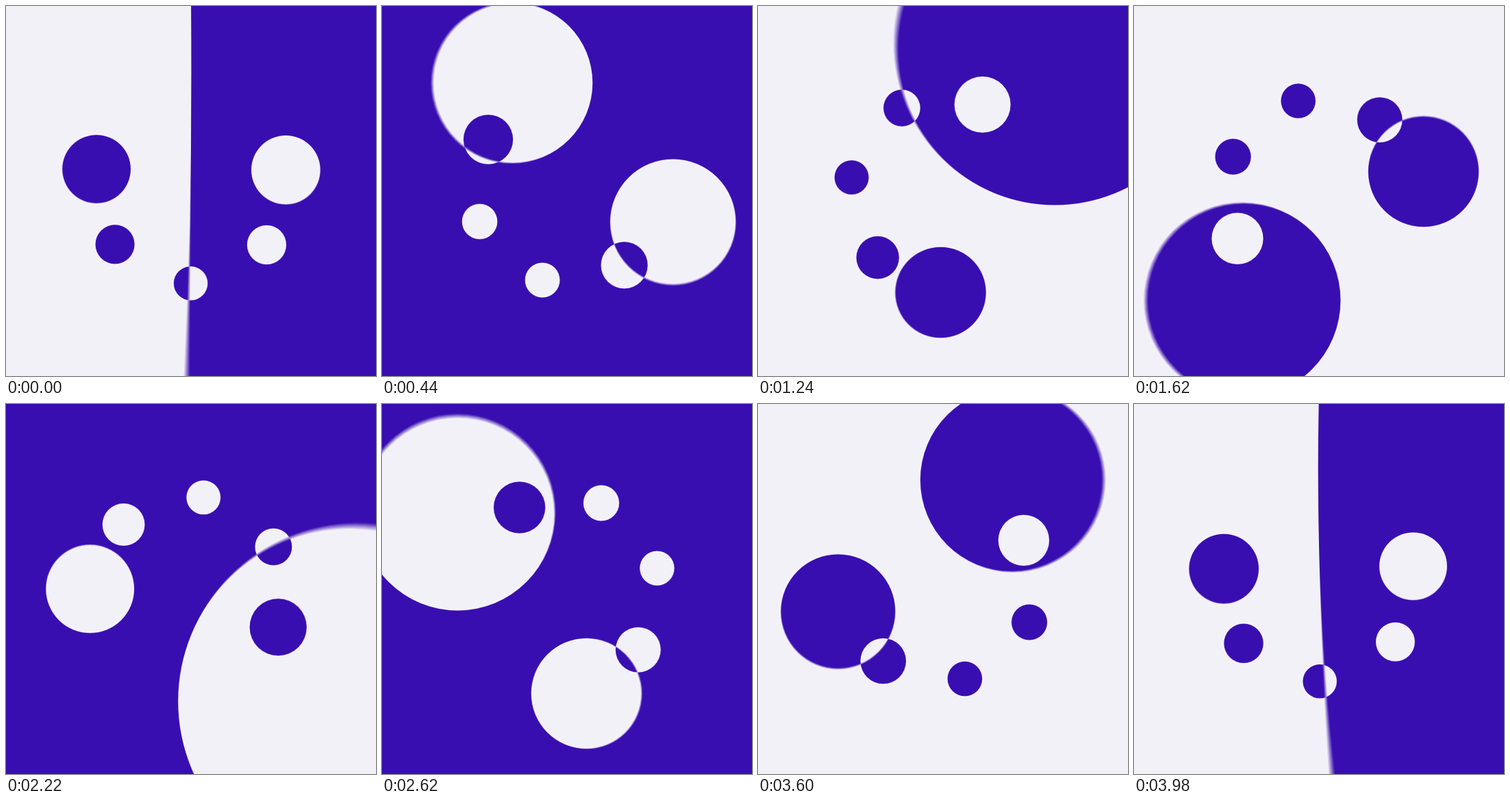
An HTML page with a canvas that plays this animation: 540 by 540 pixels, repeating every 4000 ms.

```html
<!DOCTYPE html>
<html lang="en">
<head>
<meta charset="utf-8">
<title>Inverting circles</title>
<style>
  html, body { margin: 0; width: 100%; height: 100%; overflow: hidden; background: #390eb1; }
  canvas { display: block; }
</style>
</head>
<body>
<canvas width="540" height="540"></canvas>
<script>
const ctx = document.querySelector('canvas').getContext('2d');
const LIGHT = '#f3f1f8', BLUE = '#390eb1';
const SIZE = 540, MID = SIZE / 2, LOOP = 4000, STEP = 1000;
const COUNT = 6, RING = 132.5, MIN_R = 24.75;
const SHUTTER = 8, SAMPLES = 8;
const rad = Math.PI / 180;

// Slows the phase a little where a circle opens into a straight line.
function settle(phase) {
  const near = Math.min(phase, 180 - phase);
  const lag = 1.25 * near / 9 * Math.exp(1 - near / 9);
  return phase + (phase < 90 ? -lag : lag);
}

// Each circle stays orthogonal to the ring while its curvature swings through zero.
function addCircle(path, phase, turn) {
  const p = settle(phase) * rad;
  const r = MIN_R / Math.max(Math.sin(p), 2e-4);
  const d = Math.hypot(r, RING);
  const lean = Math.atan(0.1854 / Math.tan(p)) - rad * Math.sin(2 * phase * rad);
  const a = Math.PI - 2 * phase * rad - lean + turn;
  const x = MID - d * Math.sin(a), y = MID + d * Math.cos(a);
  path.moveTo(x + r, y);
  path.arc(x, y, r, 0, 2 * Math.PI);
}

function drawAt(time) {
  const t = time % LOOP;
  const flipped = Math.floor(t / STEP) % 2 === 1;
  const shift = t % STEP / STEP;
  const path = new Path2D();
  for (let i = 0; i < COUNT; i++) {
    addCircle(path, (i + shift) * 180 / COUNT, t / LOOP * 2 * Math.PI);
  }
  ctx.fillStyle = flipped ? LIGHT : BLUE;
  ctx.fillRect(0, 0, SIZE, SIZE);
  ctx.fillStyle = flipped ? BLUE : LIGHT;
  ctx.fill(path, 'evenodd');
}

// One sample is drawn off screen, then blended in, giving an even motion blur.
const stage = ctx.canvas;
const blend = document.createElement('canvas');
blend.width = blend.height = SIZE;
const mix = blend.getContext('2d');

function frame(now) {
  for (let i = 0; i < SAMPLES; i++) {
    drawAt(now + (i + 0.5) / SAMPLES * SHUTTER);
    mix.globalAlpha = 1 / (i + 1);
    mix.drawImage(stage, 0, 0);
  }
  ctx.drawImage(blend, 0, 0);
}

const start = performance.now();
function tick() {
  frame(performance.now() - start);
  requestAnimationFrame(tick);
}
tick();
</script>
</body>
</html>
```
